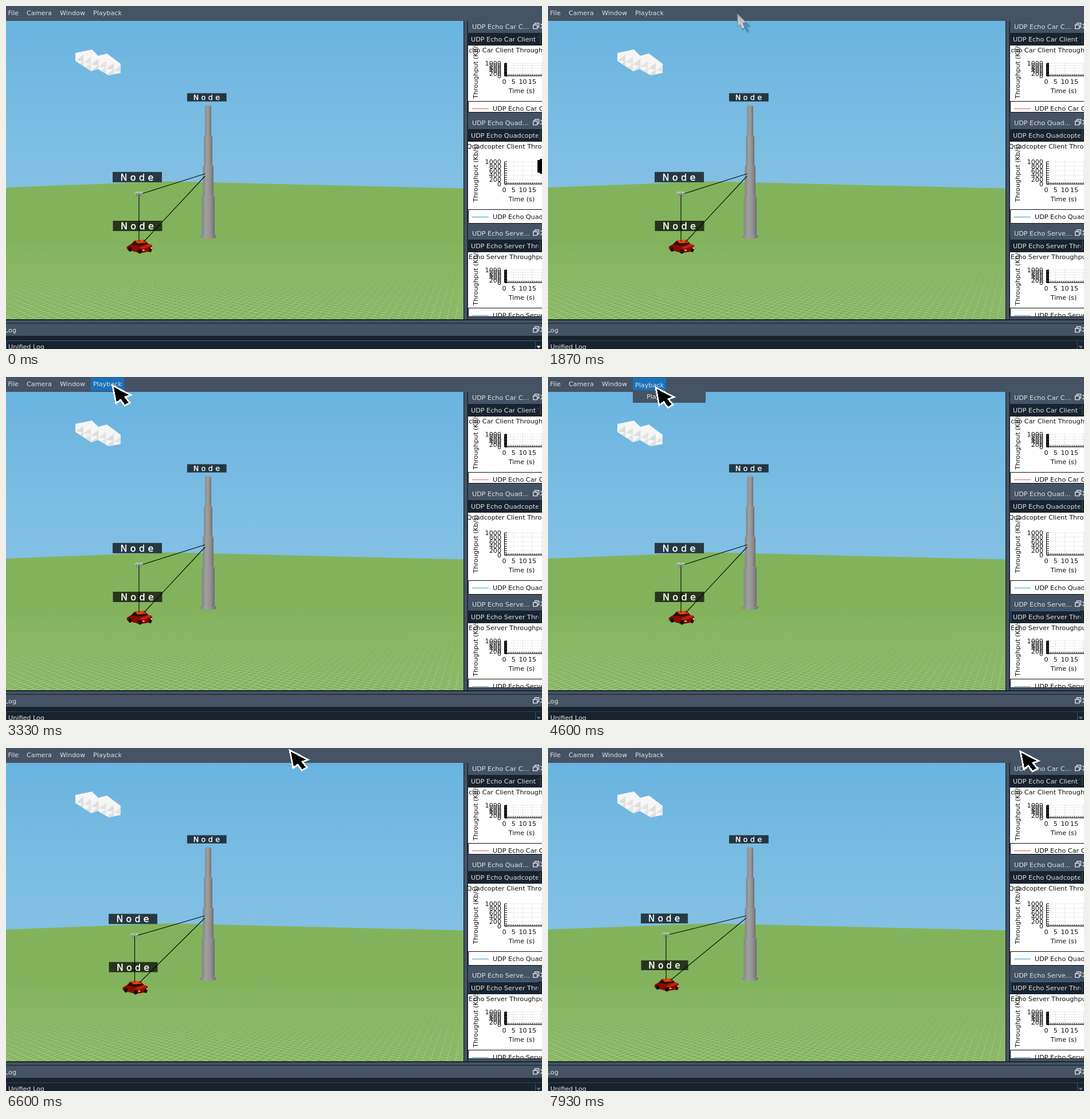
Write an HTML page that moves like this. It is 935 px wide and 599 px high and loops after 8000 ms.

```html
<!DOCTYPE html>
<html lang="en">
<head>
<meta charset="utf-8">
<title>Network playback</title>
<style>
html, body { margin: 0; width: 100%; height: 100%; overflow: hidden; background: #455364; }
svg { display: block; width: 935px; height: 599px; }
text { font: 11.2px "DejaVu Sans", sans-serif; fill: #e0e1e3; white-space: pre; }
.ink text { fill: #111; }
.r { text-anchor: end; }
.m { text-anchor: middle; }
.node text { font-size: 16px; letter-spacing: 5.4px; fill: #fff; stroke: #fff; stroke-width: .4px; }
</style>
</head>
<body>
<svg id="stage" viewBox="0 0 935 599" xmlns="http://www.w3.org/2000/svg"></svg>
<script>
const DARK = '#19232d', BAR = '#455364', BLUE = '#1a72bb', LOOP = 8000, STEP = 1000 / 15;
const range = (n, fn) => Array.from({ length: n }, (_, i) => fn(i)).join('');
const rect = (x, y, w, h, fill, more = '') =>
  `<rect x="${x}" y="${y}" width="${w}" height="${h}" fill="${fill}" ${more}/>`;
const oval = (x, y, rx, ry, fill) => `<ellipse cx="${x}" cy="${y}" rx="${rx}" ry="${ry}" fill="${fill}"/>`;
const text = (x, y, s, more = '') => `<text x="${x}" y="${y}" ${more}>${s}</text>`;
const poly = (points, fill, more = '') => `<polygon points="${points}" fill="${fill}" ${more}/>`;
const stroke = (d, color, more = '') => `<path d="${d}" fill="none" stroke="${color}" ${more}/>`;
const clip = (id, shape) => `<clipPath id="${id}">${shape}</clipPath>`;
const gradient = (id, vertical, colors, more = '') =>
  `<linearGradient id="${id}" x2="${vertical ? 0 : 1}" y2="${vertical ? 1 : 0}" ${more}>` +
  colors.map((c, i) => `<stop offset="${i / (colors.length - 1)}" stop-color="${c}"/>`).join('') + '</linearGradient>';

// Two families of ground lines, each running to its vanishing point.
function groundGrid() {
  const family = (vx, from, step, n) => range(n, i => `M${vx} 287L${(from + i * step).toFixed(1)} 547`);
  return stroke(family(831, -1085, 14.6, 132) + family(-516, -8, 21.2, 121), '#c3dfac', 'mask="url(#fade)"');
}

// Four stacked cylinders, each wider than the one above.
function tower() {
  const cx = 352.7;
  const section = i => {
    const w = 22.6 - 4 * i, top = 331 - 52.7 * i;
    return rect(cx - w / 2, top, w, i ? 54 : 70, 'url(#steel)', 'rx="1.5"') + oval(cx, top + 1, w / 2, 1.5, '#9b9b9b');
  };
  return rect(cx - 13.8, 398, 27.6, 8, 'url(#steel)', 'rx="4"') + oval(cx, 399, 13.8, 2.6, '#a2a2a2') + range(4, section);
}

// A white outline filled with a lattice of shaded triangles.
function cloud() {
  const outline = poly('121,82 150,76 161,87 176,83 200,101 200,117 179,121 160,110 149,114 121,96', '#f6f6f6');
  const facet = i => {
    const x = 122 + i % 6 * 13.2, y = 85 + i % 6 * 3.6 + (i / 6 | 0) * 11;
    return poly(`${x},${y + 10} ${x + 13},${y} ${x + 13},${y + 12}`, i % 2 ? '#e4e4e4' : '#dedede');
  };
  return clip('cloud', outline) + outline + `<g clip-path="url(#cloud)">${range(18, facet)}</g>`;
}

const label = (id, more = '') => `<g id="${id}" class="node" ${more}>` +
  rect(-43, -9, 86, 18, '#000', 'fill-opacity=".7"') + text(-29.5, 6, 'Node') + '</g>';

const car = `<g id="car">` +
  poly('-22,0 -14,-5 -8,-11 9,-12 16,-5 22,-3 23,4 20,8 1,11 -21,5', '#860b02') +
  poly('-14,-4 -8,-10 10,-11 15,-5 0,-2', '#2c0d08') +
  poly('-8,-11 9,-12 12,-7 -3,-6', '#e8430a') +
  poly('-1,2 16,-5 22,-2 6,4', '#c02404') +
  rect(6, 5, 3, 2, '#eee') + rect(20, 1, 2.5, 2.5, '#eee') +
  oval(-16, 4.5, 3, 4, '#17110f') + oval(1, 8, 3.3, 4, '#17110f') + oval(19, 6, 2.5, 3.5, '#17110f') + '</g>';

const drone = `<g id="drone">` + stroke('M-8-2H-1M2-2H8M-6-4H0M1-4H6', '#c6cdd1', 'stroke-width="1.3"') +
  stroke('M-6-2L0 1L6-2M-4 4L-3 0H3L4 4', '#64717a') + rect(-3, -2, 6, 4, '#8e9aa1') + '</g>';

const scene = `<g clip-path="url(#view)">` + rect(0, 26, 798, 300, 'url(#sky)') +
  poly('0,317 283,306.3 798,318.5 798,548 0,548', '#82b35c') + groundGrid() + cloud() + tower() +
  label('mast', 'transform="translate(350.3 159.5) scale(.8)"') + car + drone +
  '<path id="links" fill="none" stroke="#0b0b0b" stroke-width="1.15"/>' +
  label('droneLabel') + label('carLabel') + '</g>';

const dockIcons = y => stroke(`M922.5 ${y - 2}V${y - 5}H929.5V${y + 2}H927M932.5 ${y - 4}l8 8M932.5 ${y + 4}l8-8
  M919.7 ${y - 2}h7v6.6h-7z`, '#e0e1e3', 'stroke-width="1.4"');

function dock({ id, top, bottom, height, shift, color, title, name }) {
  const chart = top + 43, base = top + height + (height > 30 ? 78 : 74), axis = base - height;
  const step = height / 5, legend = base + 45, minor = height > 30 ? 2 : 4;
  const column = i => 869 + i * 16.3;
  const grid = range(5, i => `M870 ${axis + i * step}H935`) + range(4, i => `M${column(i + 1)} ${axis}V${base}`);
  return rect(806, top, 129, bottom - top, BAR) + text(813, top + 13.5, title) + dockIcons(top + 9) +
    rect(806, top + 21, 129, 22, DARK) + rect(931.5, top + 23, 1, 17, BAR) +
    `<g clip-path="url(#tab)">${text(811, top + 35.5, name + ' Throughput')}</g>` +
    stroke(`M928 ${top + 21.5}H807.5V${top + 41}`, BLUE, `id="${id}Focus" visibility="hidden"`) +
    clip(id, rect(806, chart, 129, bottom - chart)) +
    `<g class="ink" clip-path="url(#${id})">` + rect(806, chart, 129, 200, '#fff') +
    text(806 - shift, top + 54.5, name + ' Throughput') +
    stroke(grid, '#c4c4c4', 'stroke-dasharray="1 2"') +
    stroke(`M869.5 ${axis}V${base}H935`, '#000') +
    stroke(`M872 ${axis - .5}V${base + 1}`, '#000', `stroke-width="4" stroke-dasharray="1 ${step / minor - 1}"`) +
    stroke(`M869 ${base - 1.5}H935`, '#000', 'stroke-width="3" stroke-dasharray="1 2.26"') +
    range(6, i => text(864, axis + i * step + 4, 1000 - i * 200, 'class="r"')) +
    range(4, i => text(column(i), base + 14, i * 5, 'class="m"')) +
    text(899.5, base + 30, 'Time (s)', 'class="m"') +
    text(0, 0, 'Throughput (Kb/s)', `class="m" transform="translate(823 ${base - height / 2}) rotate(-90)"`) +
    rect(806, legend, 129, 40, '#fff') +
    stroke(`M813 ${legend + 12.5}H842`, color) + text(849, legend + 15.5, name) +
    stroke(`M935 ${legend - .5}H806.5V${bottom - .5}H935`, '#111') + '</g>';
}

const docks = [
  { id: 'car-chart', top: 26, bottom: 186, height: 22, shift: 33, color: '#d9603f', title: 'UDP Echo Car C…', name: 'UDP Echo Car Client' },
  { id: 'quad-chart', top: 194, bottom: 380, height: 39, shift: 60, color: '#3c93c2', title: 'UDP Echo Quad…', name: 'UDP Echo Quadcopter Client' },
  { id: 'server', top: 387, bottom: 543, height: 22, shift: 26, color: '#4a86b4', title: 'UDP Echo Serve…', name: 'UDP Echo Server' }
];

const menuBar = rect(0, 0, 935, 26, BAR) + rect(148, 1, 58, 23, BLUE, 'id="hot"') +
  text(3.5, 16.3, 'File') + text(36, 16.3, 'Camera') + text(94, 16.3, 'Window') + text(152, 16.3, 'Playback', 'id="playback"') +
  `<g id="menu">${rect(148, 23, 127, 22, BAR, 'id="item"')}${text(172, 38, 'Play')}</g>`;

const logPanel = rect(0, 547, 935, 29, BAR) + rect(0, 547, 935, 2, DARK) + rect(0, 553.5, 935, 1.2, DARK) +
  text(-2, 570, 'Log') + dockIcons(565) +
  rect(0, 576, 935, 23, DARK) + rect(.5, 584.5, 936, 24, DARK, 'id="combo" rx="3"') +
  rect(923, 586, 1, 13, BAR) + text(4, 599, 'Unified Log') + poly('925.5,593.5 933,593.5 929.2,598', BAR, 'id="arrow"');

const ARROW = '0,0 1,23 5,19 9,27 13,25 10,17 16,16';
const pointer = '<g id="pointer">' +
  poly('2,2 34,18.5 24,22 32,32 23,37 16,27 8,33', '#000',
    'id="big" stroke="#fff" stroke-width="2.8" shape-rendering="crispEdges"') +
  '<g id="soft">' + poly(ARROW, '#23455e', 'transform="translate(8 7)" opacity=".35"') +
  poly(ARROW, 'url(#chrome)', 'stroke="#71767a"') + '</g></g>';

const stage = document.getElementById('stage');
stage.innerHTML = '<defs>' +
  gradient('sky', true, ['#69b4e0', '#78bbe2', '#83c1e4']) +
  gradient('steel', false, ['#858585', '#a0a0a0', '#929292', '#707070']) +
  gradient('chrome', true, ['#a5a9ac', '#d8dadb']) +
  gradient('ramp', true, ['#000', '#404040', '#a0a0a0']) +
  `<mask id="fade" maskUnits="userSpaceOnUse" x="0" y="410" width="798" height="138">${rect(0, 410, 798, 138, 'url(#ramp)')}</mask>` +
  clip('view', rect(0, 26, 798, 521)) + clip('tab', rect(806, 0, 122.5, 599)) + '</defs>' +
  rect(0, 0, 935, 599, BAR) + scene + rect(798, 26, 1.2, 522, DARK) + rect(804.5, 26, 1.5, 522, DARK) +
  docks.map(dock).join('') + `<g id="burst">${rect(927, 269, 4, 22, '#000')}${rect(931, 267, 4, 26, '#000')}</g>` +
  logPanel + menuBar + pointer;

const el = Object.fromEntries([...stage.querySelectorAll('[id]')].map(e => [e.id, e]));
const show = (e, on) => e.setAttribute('visibility', on ? 'visible' : 'hidden');
const place = (e, x, y, s = 1) => e.setAttribute('transform', `translate(${x} ${y}) scale(${s})`);

// Pointer moves: start, duration, destination.
const moves = [
  [66, 530, 772, 15], [600, 330, 630, 14], [1860, 1, 330, 13], [1867, 530, 236, 25], [2730, 600, 184, 13],
  [4470, 660, 194, 31], [6060, 540, 493, 2], [6600, 530, 655, 7], [7530, 400, 822, 4]
];
const pointerAt = t => moves.reduce(([x, y], [start, length, toX, toY]) => {
  const k = Math.min(1, Math.max(0, (t - start) / length));
  return [x + (toX - x) * k, y + (toY - y) * k];
}, [905, 572]);

function render(time) {
  const t = Math.floor((time + 4) / STEP) * STEP;
  const between = (a, b) => t >= a && t < b;
  const drive = Math.max(0, (t - 6060) / 1870), size = 1 - .047 * drive;
  const x = 232 - 26 * drive, y = 329 - 2 * drive, roof = 411 - 6.5 * drive, mast = 347.2 - 1.5 * drive;

  place(el.car, x + .5, roof + 9.5, size);
  place(el.drone, x, y, size);
  place(el.droneLabel, x - 3, 298.8 - 1.1 * drive, size);
  place(el.carLabel, x - 2.5, 384 - 4.6 * drive, size);
  el.links.setAttribute('d', `M${x + 6} ${y - 1.5}L${mast} 293M${x} ${y}V${roof}M${x + 8} ${roof + 1}L${mast} 297`);

  const soft = between(1860, 1930), open = between(3060, 6190), hover = t < 130;
  place(el.pointer, ...pointerAt(t));
  show(el.big, t >= 60 && !between(1390, 1930));
  show(el.soft, soft);
  show(el.hot, open);
  el.playback.setAttribute('y', open && t > 4260 ? 18 : 16.3);
  show(el.menu, between(4060, 5730));
  el.item.setAttribute('fill', t > 4600 ? BLUE : BAR);
  show(el.burst, t < 60);
  show(el.serverFocus, t > 4260);
  el.combo.setAttribute('stroke', hover ? '#346792' : '#33465a');
  el.arrow.setAttribute('fill', hover ? '#e0e1e3' : '#60798b');
}

function frame() {
  render(performance.now() % LOOP);
  requestAnimationFrame(frame);
}
frame();
</script>
</body>
</html>
```
